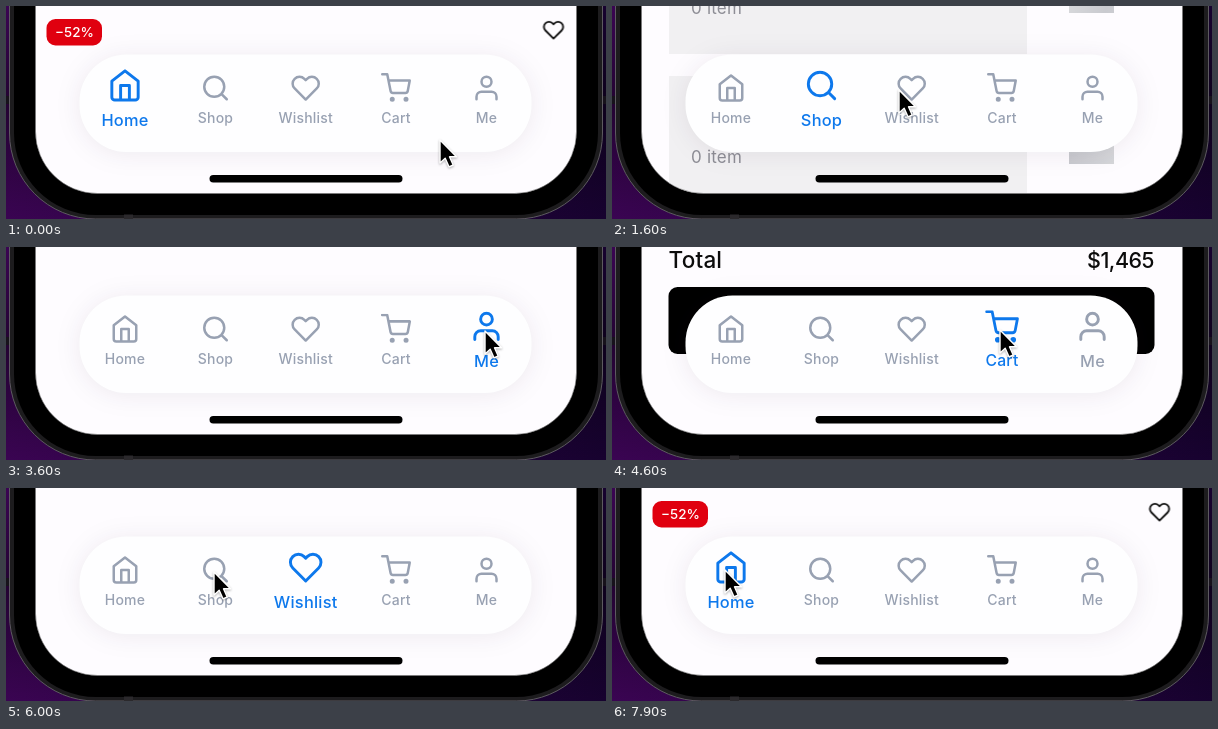
An HTML page for the animation above (8000 ms loop, 600 by 213 pixels).

```html
<!DOCTYPE html>
<html lang="en">
<head>
<meta charset="utf-8">
<title>Tab bar</title>
<style>
  html, body { margin: 0; width: 100%; height: 100%; overflow: hidden; background: #000; }
  svg { display: block; width: 600px; height: 213px; font-family: Inter, "Open Sans", sans-serif; font-weight: 500; }
  .bar { filter: drop-shadow(0 2px 12px rgba(30, 20, 40, .075)); }
  .icon { fill: none; stroke: currentColor; stroke-width: 2; stroke-linecap: round; stroke-linejoin: round; }
  .tab text { font-size: 14px; font-weight: 550; letter-spacing: .2px; text-anchor: middle; fill: currentColor; }
  .page { opacity: 0; }
  .pointer { filter: drop-shadow(0 1px 1px rgba(0, 0, 0, .3)); }
</style>
</head>
<body>
<svg viewBox="0 0 600 213">
  <defs>
    <linearGradient id="wall">
      <stop stop-color="#3a0452"/><stop offset="1" stop-color="#17022f"/>
    </linearGradient>
    <linearGradient id="dusk" x2="0" y2="1">
      <stop stop-opacity="0"/><stop offset=".45" stop-opacity=".4"/><stop offset="1" stop-opacity="0"/>
    </linearGradient>
    <linearGradient id="thumb" x2="1" y2="1">
      <stop stop-color="#d9dadd"/><stop offset=".5" stop-color="#c9cacf"/><stop offset="1" stop-color="#d6d7da"/>
    </linearGradient>
    <clipPath id="glass"><rect x="29.500" y="-200" width="541" height="387.500" rx="62"/></clipPath>
  </defs>

  <rect width="600" height="213" fill="url(#wall)"/>
  <rect width="600" height="213" fill="url(#dusk)"/>
  <path d="M0 90h8v8H0zM592 90h8v8h-8z" fill="#17121b"/>
  <rect x="3.500" y="-200" width="593" height="413" rx="86" fill="#1d1c1e" stroke="#5d5a60"/>
  <rect x="8" y="-200" width="584" height="409" rx="82" fill="#000"/>
  <path d="M118 208.500h9v4.500h-9z" fill="#2b292c"/>

  <g clip-path="url(#glass)">
    <rect x="29" width="542" height="188" fill="#fefcff"/>

    <g class="page" data-tabs="0">
      <rect x="40.500" y="13" width="55.500" height="26.500" rx="9" fill="#e0000f"/>
      <text x="68.500" y="31" font-size="13.500" text-anchor="middle" fill="#fff">−52%</text>
      <g id="fav" color="#111" transform="translate(547.500 24) scale(.92) translate(-12 -12)"></g>
    </g>

    <g class="page" data-tabs="1">
      <path d="M57 0h358v48H57zM57 70h358v117H57z" fill="#f1f0f2"/>
      <path d="M457-30h45v37h-45zM457 121h45v37h-45z" fill="url(#thumb)"/>
      <g font-size="17" font-weight="400" letter-spacing=".2" fill="#8d8d95">
        <text x="79" y="7.500">0 item</text>
        <text x="79" y="157">0 item</text>
      </g>
    </g>

    <g class="page" data-tabs="3">
      <g fill="#0c0c0c">
        <text x="56.500" y="21" font-size="22.500" letter-spacing=".2">Total</text>
        <text x="542" y="21" font-size="21.500" letter-spacing="-.5" text-anchor="end">$1,465</text>
      </g>
      <rect x="56.500" y="40" width="486" height="67" rx="9" fill="#000"/>
    </g>

    <rect class="bar" x="73.500" y="48.500" width="452" height="97.500" rx="47" fill="#fefeff"/>
    <g id="tabs"></g>
    <rect x="203.500" y="169" width="193" height="7.500" rx="3.750" fill="#000"/>
  </g>
  <rect x="29.500" y="-200" width="541" height="387.500" rx="62" fill="none" stroke="#777" stroke-opacity=".6"/>

  <g id="pointer">
    <path class="pointer" d="M0 0V23L5.200 18.300 9 26.800 13.200 25 9.500 16.800H16.500Z" fill="#000" stroke="#fff" stroke-width="1.400" stroke-linejoin="round"/>
  </g>
</svg>
<script>
const LOOP = 8000, BIG = 1.17, BLUE = '#0d78ec', GREY = '#98a1b2';

const HEART = 'M20.840 4.610a5.500 5.500 0 0 0-7.780 0L12 5.670l-1.060-1.060a5.500 5.500 0 0 0-7.780 7.780L12 21.230l8.840-8.840a5.500 5.500 0 0 0 0-7.780z';
const circle = (x, y, r) => `M${x - r} ${y}a${r} ${r} 0 1 0 ${2 * r} 0a${r} ${r} 0 1 0 ${-2 * r} 0`;
const TABS = [
  ['Home', 119, 'M3 9l9-7 9 7v11a2 2 0 0 1-2 2H5a2 2 0 0 1-2-2zM9 22V12h6v10'],
  ['Shop', 209.5, circle(11, 11, 8) + 'M21 21l-4.350-4.350'],
  ['Wishlist', 299.7, HEART],
  ['Cart', 390, circle(9, 21, 1) + circle(20, 21, 1) +
    'M1 1h4l2.680 13.390a2 2 0 0 0 2 1.610h9.720a2 2 0 0 0 2-1.610L23 6H6'],
  ['Me', 480.5, circle(12, 7, 4) + 'M20 21v-2a4 4 0 0 0-4-4H8a4 4 0 0 0-4 4v2']
];

// [time, tab]
const TAPS = [[0, 0], [1100, 1], [2000, 2], [2715, 3], [3340, 4], [4515, 3], [5260, 2], [6050, 1], [7050, 0]];

// [time, x, y]
const PATH = [
  [0, 434, 134], [100, 434, 134], [850, 209, 84], [1150, 209, 84], [1500, 287, 84], [2050, 287, 84],
  [2500, 386, 84], [2690, 386, 84], [2800, 421, 84], [3050, 479, 84], [3600, 479, 84], [4350, 388, 83],
  [4650, 388, 83], [5100, 300, 83], [5450, 300, 83], [5950, 208, 84], [6150, 208, 84], [6500, 113, 82]
];

const icon = d => `<path class="icon" d="${d}"/>`;

// Loops one property through [time, value] steps.
function play(el, prop, steps, easing) {
  const frames = steps.map(([t, v]) => ({ offset: t / LOOP, [prop]: v, easing }));
  frames.push({ offset: 1, [prop]: steps[steps.length - 1][1] });
  el.animate(frames, { duration: LOOP, iterations: Infinity });
}

document.getElementById('fav').innerHTML = icon(HEART);
const bar = document.getElementById('tabs');
bar.innerHTML = TABS.map(([name, x, d]) => `<g transform="translate(${x} 97)"><g class="tab">
  <g transform="translate(0 -15) scale(1.25) translate(-12 -12)">${icon(d)}</g>
  <text y="20">${name}</text></g></g>`).join('');

bar.querySelectorAll('.tab').forEach((el, i) => {
  const size = [[0, `scale(${i ? 1 : BIG})`]];
  TAPS.forEach(([t, tab], k) => {
    if (!k) return;
    if (tab === i) size.push([t, 'scale(1)'], [t + 160, `scale(${BIG})`]);
    else if (TAPS[k - 1][1] === i) size.push([t + 90, `scale(${BIG})`], [t + 290, 'scale(1)']);
  });
  play(el, 'transform', size, 'ease-out');
  play(el, 'color', TAPS.map(([t, tab]) => [t, tab === i ? BLUE : GREY]), 'steps(1)');
});

document.querySelectorAll('.page').forEach(el => {
  play(el, 'opacity', TAPS.map(([t, tab]) => [t, +(tab === +el.dataset.tabs)]), 'steps(1)');
});

play(document.getElementById('pointer'), 'transform',
  PATH.map(([t, x, y]) => [t, `translate(${x}px, ${y}px)`]), 'ease-in-out');
</script>
</body>
</html>
```
